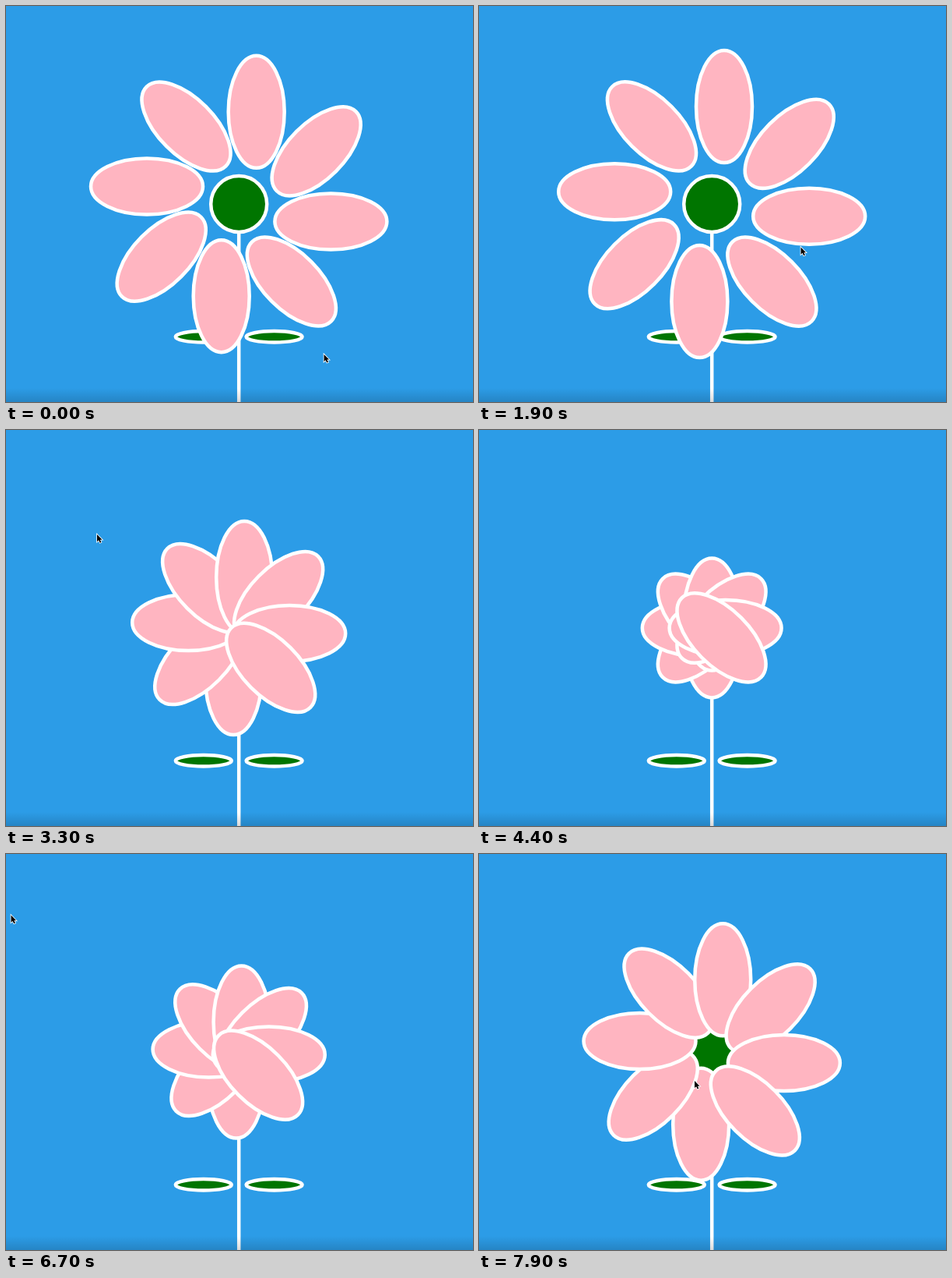
Animation, 600 px wide and 508 px high, one loop 8 s. Source, as an HTML page with a canvas:

```html
<!DOCTYPE html>
<html lang="en">
<head>
<meta charset="utf-8">
<title>Flower</title>
<style>
  html, body { margin: 0; width: 100%; height: 100%; overflow: hidden; background: #2c9ce7; }
  canvas { display: block; }
</style>
</head>
<body>
<canvas id="stage" width="600" height="508"></canvas>
<script>
const ctx = document.getElementById('stage').getContext('2d');
const LOOP = 8000, STEP = 100;
const LEAD = 60; // the pointer runs this far ahead of the flower, in ms
const CX = 299.2, CY = 254;
const GREEN = '#007500', PINK = '#ffb5c1';

// The hand's path as [time, x, y]; it drives both the pointer and the petals.
const path = [
  [0, 391, 450], [960, 672, 400], [1800, 485, 326], [1900, 425, 316],
  [2700, 272, 230], [3300, 125, 140], [3600, 85, 110], [4400, -113, 0],
  [6200, -113, 0], [6700, -7, 68], [8000, 286, 298]
];

function hand(t) {
  const i = path.findIndex(p => p[0] > t);
  const [t0, x0, y0] = path[i - 1], [t1, x1, y1] = path[i];
  const k = (t - t0) / (t1 - t0);
  return { x: x0 + (x1 - x0) * k, y: y0 + (y1 - y0) * k };
}

function ellipse(x, y, rx, ry, fill) {
  ctx.beginPath();
  ctx.ellipse(x, y, rx, ry, 0, 0, Math.PI * 2);
  ctx.fillStyle = fill;
  ctx.fill();
  ctx.stroke();
}

function drawPetals({ x, y }) {
  ctx.save();
  ctx.translate(CX, CY);
  ctx.rotate(Math.PI);
  for (let i = 0; i < 8; i++) {
    ellipse(y / 20, -40 - x / 5, 36, 72, PINK);
    ctx.rotate(Math.PI / 4);
  }
  ctx.restore();
}

const arrow = new Path2D('M0 0V11.2L2.6 8.9L4.5 13L6.5 12.1L4.7 8.2H8Z');

function drawPointer({ x, y }) {
  ctx.save();
  ctx.translate(x, y);
  ctx.scale(0.82, 0.82);
  ctx.lineWidth = 2;
  ctx.stroke(arrow);
  ctx.fillStyle = '#000';
  ctx.fill(arrow);
  ctx.restore();
}

const shade = ctx.createLinearGradient(0, 490, 0, 508);
shade.addColorStop(0, 'rgba(0,0,0,0)');
shade.addColorStop(1, 'rgba(0,0,0,.15)');

function draw(t) {
  ctx.fillStyle = '#2c9ce7';
  ctx.fillRect(0, 0, 600, 508);
  ctx.strokeStyle = '#fff';
  ctx.lineWidth = 4.5;

  ctx.beginPath();
  ctx.moveTo(CX, CY);
  ctx.lineTo(CX, 508);
  ctx.stroke();
  for (const side of [-1, 1]) ellipse(CX + side * 45.4, 424.3, 36, 7.2, GREEN);
  ellipse(CX, CY, 36, 36, GREEN);
  drawPetals(hand(t));

  ctx.fillStyle = shade;
  ctx.fillRect(0, 490, 600, 18);
  drawPointer(hand(t + LEAD));
}

function tick() {
  draw(Math.floor(performance.now() % LOOP / STEP) * STEP);
  requestAnimationFrame(tick);
}
tick();
</script>
</body>
</html>
```
